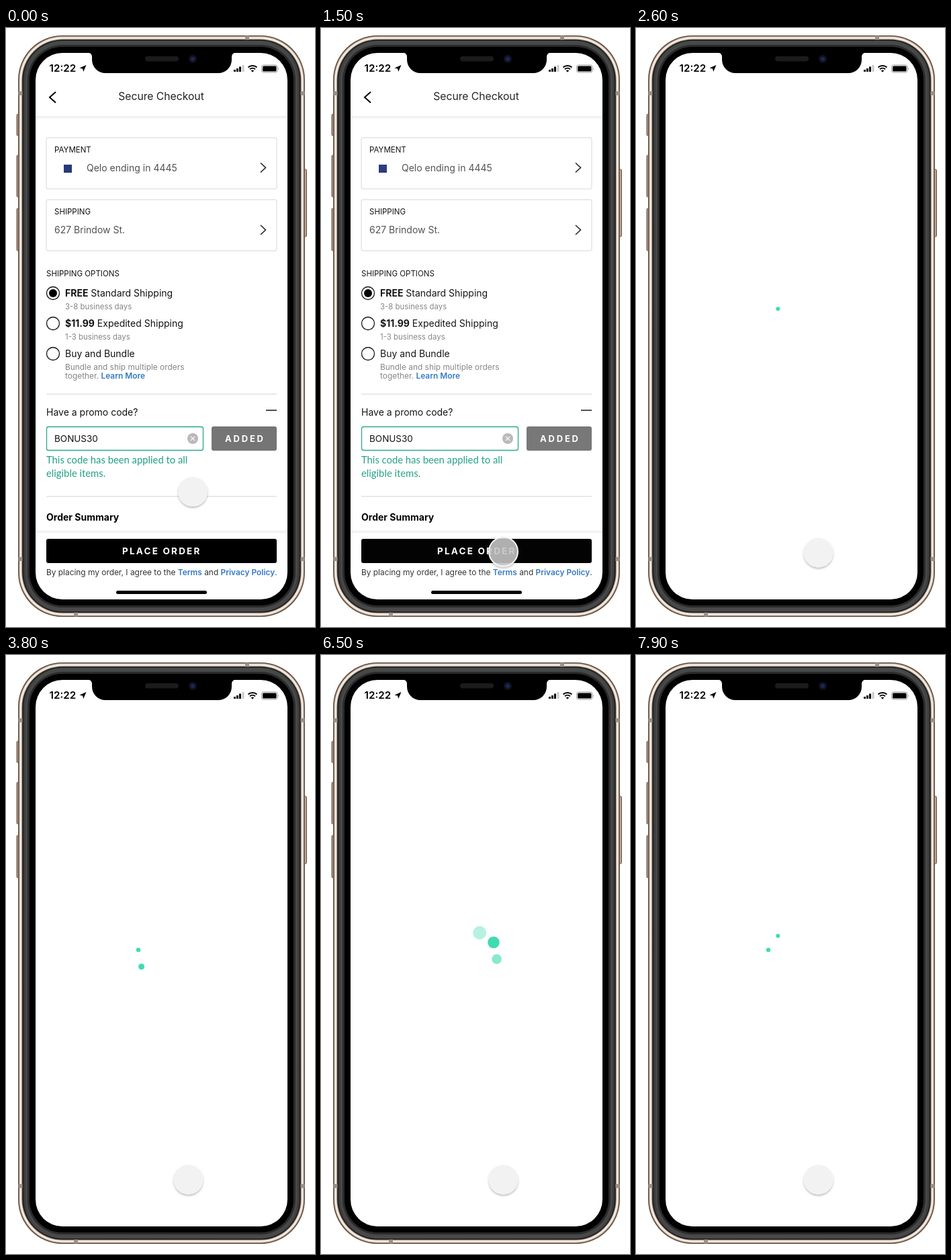
An HTML page for the animation above (8 s loop, 460 px wide and 890 px high).

```html
<!DOCTYPE html>
<html lang="en">
<head>
<meta charset="utf-8">
<title>Secure Checkout</title>
<style>
  html, body { margin: 0; width: 100%; height: 100%; overflow: hidden; background: #fff; }
  svg { display: block; width: 460px; height: 890px; }
  text { font-family: Inter, sans-serif; white-space: pre; }
  .bold { font-weight: 700; }
  .semi { font-weight: 600; }
  .link { font-weight: 600; fill: #3478c6; }
  .label { font-size: 11.5px; fill: #111; }
  .body { font-size: 14px; fill: #111; }
  .value { font-size: 14px; fill: #505050; }
  .hint { font-size: 11.4px; fill: #858585; }
  .note { font-size: 11.9px; fill: #858585; }
  .ok { font: 14.8px Lato, sans-serif; fill: #1fa083; }
  .line { fill: none; stroke: #222; stroke-width: 1.6; }
  .back { fill: none; stroke: #000; stroke-width: 2; }
  .card { fill: #fff; stroke: #e3e3e3; stroke-width: 1.4; }
  .rule { stroke: #e2e2e2; stroke-width: 1.5; }
  .radio { fill: none; stroke: #111; stroke-width: 1.3; }
</style>
</head>
<body>
<svg viewBox="0 0 460 890">
  <defs>
    <linearGradient id="metal" x2="0" y2="1">
      <stop offset="0" stop-color="#454d48"/>
      <stop offset=".06" stop-color="#3b3c3c"/>
      <stop offset=".94" stop-color="#3b3b3c"/>
      <stop offset="1" stop-color="#4a4a4c"/>
    </linearGradient>
    <linearGradient id="gold">
      <stop offset="0" stop-color="#7c6455"/>
      <stop offset=".5" stop-color="#d8bfac"/>
      <stop offset="1" stop-color="#8b7262"/>
    </linearGradient>
    <linearGradient id="fadeDown" x2="0" y2="1">
      <stop offset="0" stop-color="#ebebeb"/>
      <stop offset="1" stop-color="#fff"/>
    </linearGradient>
    <linearGradient id="fadeUp" x2="0" y2="1">
      <stop offset="0" stop-color="#fff"/>
      <stop offset="1" stop-color="#ececec"/>
    </linearGradient>
    <filter id="shadow" x="-30%" y="-30%" width="160%" height="160%">
      <feDropShadow dx="0" dy="2" stdDeviation="1.4" flood-opacity=".27"/>
    </filter>
  </defs>

  <g id="buttons" fill="url(#gold)" stroke="#51433a" stroke-width=".8"></g>
  <g id="shell"></g>
  <g id="bands" fill="#9a9189"></g>

  <path d="M122 36.500q6 .5 6 7v3.500a20 20 0 0 0 20 20h168a20 20 0 0 0 20-20v-3.500q0-6.500 6-7z"/>
  <rect x="207" y="42" width="50" height="7.500" rx="3.700" fill="#1b1b1d"/>
  <circle cx="278" cy="46" r="6" fill="#10121f"/>
  <circle cx="278" cy="46" r="3" fill="#1e2656"/>

  <g id="status">
    <text x="64.500" y="65" font-size="15.200" class="semi">12:22</text>
    <path d="M119.500 55l-4.300 10-1.100-4.500-4.600-1.100z"/>
    <path d="M339 62h3v3h-3zM343 60h3v5h-3zM347 57.500h3v7.500h-3z"/>
    <path d="M351.500 55h3v10h-3z" fill="#c8c8c8"/>
    <path d="M360.500 58.500a9.500 9.500 0 0 1 13 0M363 61.300a6 6 0 0 1 8 0" fill="none" stroke="#000" stroke-width="2"/>
    <path d="M364.800 63.300a3.500 3.500 0 0 1 4.400 0l-2.200 2.500z"/>
    <rect x="380.500" y="55" width="23.500" height="11" rx="3" fill="none" stroke="#999"/>
    <rect x="382" y="56.500" width="20.500" height="8" rx="1.600"/>
    <path d="M405.200 58.500q1.500 2 0 4z" fill="#999"/>
  </g>

  <g id="content">
    <rect x="60" y="163" width="343" height="76" rx="3" class="card"/>
    <text x="72" y="185" class="label">PAYMENT</text>
    <rect x="86" y="203" width="12" height="12" fill="#26397a"/>
    <text x="120" y="213" class="value">Qelo ending in 4445</text>
    <path d="M379 200.500l7.500 7-7.500 7" class="line"/>

    <rect x="60" y="255" width="343" height="76" rx="3" class="card"/>
    <text x="72" y="277" class="label">SHIPPING</text>
    <text x="72" y="305" class="value">627 Brindow St.</text>
    <path d="M379 293l7.500 7-7.500 7" class="line"/>

    <text x="60" y="369" class="label">SHIPPING OPTIONS</text>
    <circle cx="70" cy="394" r="9.500" class="radio"/>
    <circle cx="70" cy="394" r="6"/>
    <text x="88" y="398.500" class="body"><tspan class="bold">FREE</tspan> Standard Shipping</text>
    <text x="88" y="418" class="hint">3-8 business days</text>
    <circle cx="70" cy="439" r="9.500" class="radio"/>
    <text x="88" y="443.500" class="body"><tspan class="bold">$11.99</tspan> Expedited Shipping</text>
    <text x="88" y="463" class="hint">1-3 business days</text>
    <circle cx="70" cy="484" r="9.500" class="radio"/>
    <text x="88" y="488.500" class="body">Buy and Bundle</text>
    <text x="88" y="508" class="note">Bundle and ship multiple orders</text>
    <text x="88" y="521" class="note">together. <tspan class="link">Learn More</tspan></text>

    <path d="M60 544h343M60 696h343" class="rule"/>
    <text x="60" y="576" class="body">Have a promo code?</text>
    <path d="M387 568h16" class="line"/>
    <rect x="60.500" y="592.500" width="233" height="35" rx="3" fill="#fff" stroke="#2aa88a" stroke-width="1.300"/>
    <text x="72" y="615" font-size="13.500" fill="#111">BONUS30</text>
    <circle cx="278" cy="610" r="8" fill="#b9b9b9"/>
    <path d="M274.800 606.800l6.400 6.400m0-6.400l-6.400 6.400" stroke="#fff" stroke-width="1.200"/>
    <rect x="306" y="592" width="97" height="36" rx="3" fill="#757575"/>
    <text x="326" y="615" font-size="13" letter-spacing="2.800" fill="#fff" class="bold">ADDED</text>
    <text x="60" y="647" class="ok">This code has been applied to all</text>
    <text x="60" y="667" class="ok">eligible items.</text>
    <text x="60" y="732" font-size="14" class="bold">Order Summary</text>
  </g>

  <g id="bars">
    <path d="M74 95l-9 8 9 8" class="back"/>
    <text x="231" y="107" font-size="15.700" text-anchor="middle" fill="#222">Secure Checkout</text>
    <rect x="44" y="131" width="375" height="5" fill="url(#fadeDown)"/>

    <rect x="44" y="745" width="375" height="5" fill="url(#fadeUp)"/>
    <rect x="60" y="759" width="343" height="36" rx="3"/>
    <text x="173" y="782" font-size="13.500" letter-spacing="2.200" fill="#fff" class="bold">PLACE ORDER</text>
    <text x="60" y="813" font-size="11.900" fill="#333">By placing my order, I agree to the <tspan class="link">Terms</tspan> and <tspan class="link">Privacy Policy</tspan>.</text>
    <rect x="164" y="836" width="135" height="5" rx="2.500"/>
  </g>

  <g id="dots" fill="#40dbb3"></g>

  <g id="cursor">
    <circle id="idle" r="22" fill="#f2f2f2" filter="url(#shadow)"/>
    <circle id="pressed" r="21.500" fill="rgb(200 200 200 / .86)" stroke="#f4f4f4" stroke-width="2" filter="url(#shadow)"/>
  </g>
</svg>

<script>
  const LOOP = 8000, STEP = 100;
  const byId = id => document.getElementById(id);

  function add(parent, tag, attrs) {
    const node = document.createElementNS('http://www.w3.org/2000/svg', tag);
    for (const key in attrs) node.setAttribute(key, attrs[key]);
    return byId(parent).appendChild(node);
  }
  const box = (parent, x, y, width, height, more) => add(parent, 'rect', { x, y, width, height, ...more });

  // Phone body: nested outlines, [inset, corner radius, fill]
  for (const [inset, rx, fill] of [
    [0, 66, '#65503f'], [1.6, 64.5, '#c9b5a5'], [2.6, 63.5, '#f1eae2'], [5.4, 61, '#7a6b60'],
    [6.4, 60, '#1a1a1a'], [8, 58, 'url(#metal)'], [11, 55, '#484848'], [14, 52, '#2b2b2b'], [17, 49, '#000']
  ]) box('shell', 18 + inset, 11 + inset, 427 - 2 * inset, 864 - 2 * inset, { rx, fill });
  box('shell', 44, 37, 375, 812, { rx: 40, fill: '#fff' });

  for (const [x, y, h] of [[16, 128, 32], [16, 189, 62], [16, 268, 63], [443, 210, 100]])
    box('buttons', x, y, 4.5, h, { rx: 1.5 });

  for (const y of [94, 786]) {
    box('bands', 18.5, y, 6, 6);
    box('bands', 438.5, y, 6, 6);
  }
  box('bands', 356, 11.5, 6, 6);
  box('bands', 101, 868.5, 6, 6);

  // Loader: dots grow counterclockwise around a ring
  const RING = { x: 229.3, y: 445, r: 33 };
  const FIRST_DOT = 2150, DOT_GAP = 600, DOT_FADE = 360;
  const dots = [3, 3.2, 4.5, 5.8, 6, 7.3, 8.8, 10].map((r, i) => {
    const angle = (327 - 45 * i) * Math.PI / 180;
    return add('dots', 'circle', {
      cx: RING.x + RING.r * Math.sin(angle), cy: RING.y - RING.r * Math.cos(angle), r
    });
  });

  function ramp(t, start, end) {
    const p = Math.min(1, Math.max(0, (t - start) / (end - start)));
    return p * p * (3 - 2 * p);
  }

  function dotOpacity(t, index) {
    let sum = 0;
    for (let turn = index; turn < 12; turn += dots.length) {
      const start = FIRST_DOT + turn * DOT_GAP, end = start + 2 * DOT_GAP;
      sum += ramp(t, start, start + DOT_FADE) - ramp(t, end, end + DOT_FADE);
    }
    return sum;
  }

  function draw(t) {
    byId('content').style.opacity = 1 - ramp(t, 1480, 1700);
    byId('bars').style.opacity = 1 - ramp(t, 1480, 1760);
    dots.forEach((dot, i) => { dot.style.opacity = dotOpacity(t, i); });

    const move = ramp(t, 200, 1150);
    const press = ramp(t, 1200, 1400) - ramp(t, 1500, 1850);
    const x = 278 - 6.5 * move, y = 689 + 90.5 * move - 1.5 * press;
    byId('cursor').setAttribute('transform', `translate(${x} ${y})`);
    byId('idle').style.opacity = 1 - press;
    byId('pressed').style.opacity = press;
  }

  function tick() {
    const t = performance.now() % LOOP;
    draw(Math.floor(t / STEP) * STEP);
    requestAnimationFrame(tick);
  }
  tick();
</script>
</body>
</html>
```
